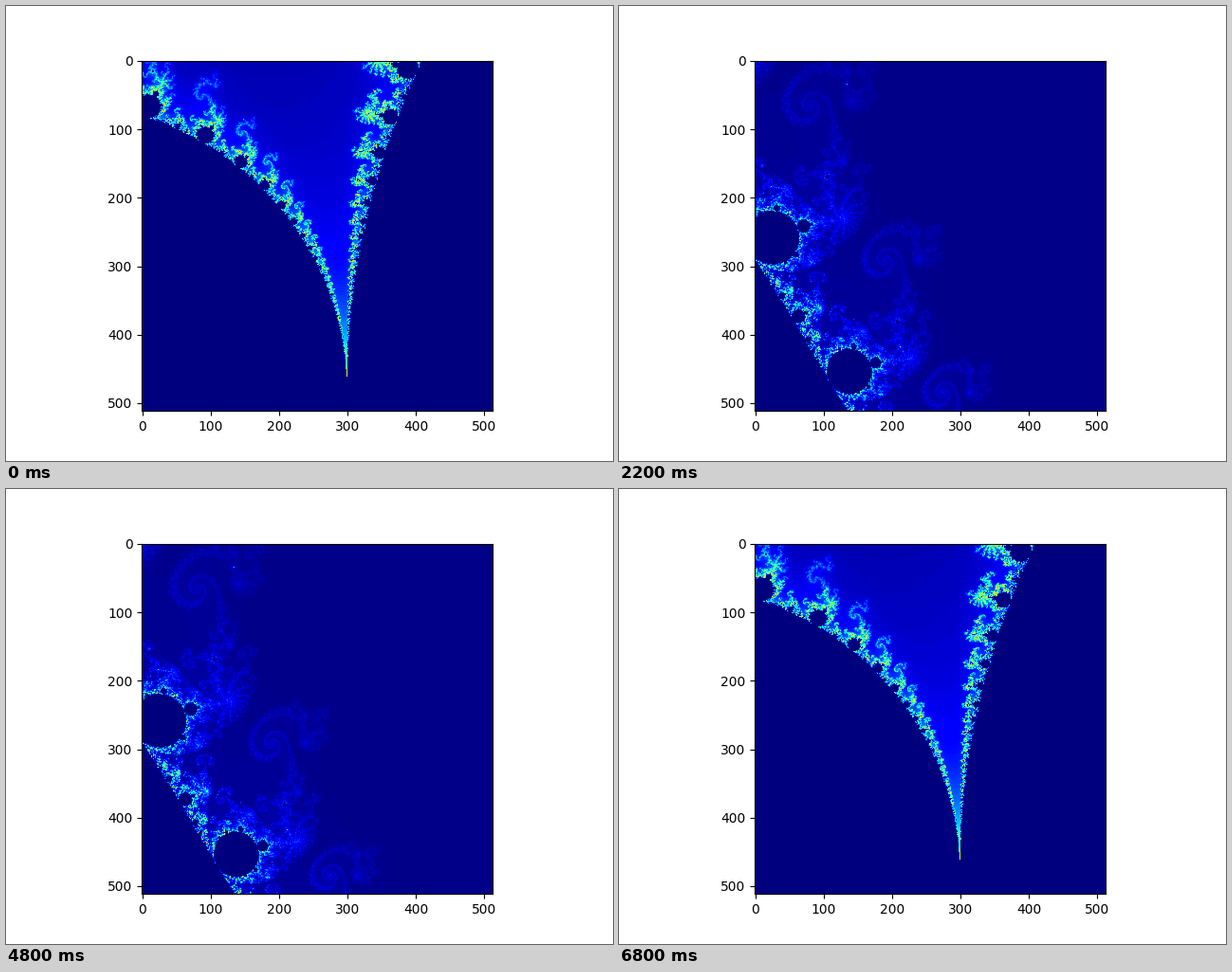
A matplotlib script for the animation above (7000 ms loop, 640 px wide and 480 px high).

```python
import numpy as np
import matplotlib.pyplot as plt
from matplotlib.animation import FuncAnimation

SIZE = 512
CENTER = (-0.77568377, 0.13646737)
SPAN = 0.3
BASE_ITER = 200
FRAMES = 35
INTERVAL = 200
CHUNK = 16


def in_main_bodies(cx, cy):
    """True inside the main cardioid or the period-2 disc."""
    y2 = cy * cy
    q = (cx - 0.25) ** 2 + y2
    return (q * (q + cx - 0.25) <= 0.25 * y2) | ((cx + 1) ** 2 + y2 <= 0.0625)


def mandelbrot(zoom):
    """Escape counts around CENTER; points that never escape are 0."""
    limit = BASE_ITER * zoom
    offset = np.linspace(-0.5, 0.5, SIZE) * SPAN / zoom
    cx, cy = (a.ravel() for a in np.meshgrid(CENTER[0] + offset,
                                             CENTER[1] - offset))
    counts = np.zeros(SIZE * SIZE, dtype=np.int32)
    idx = np.flatnonzero(~in_main_bodies(cx, cy))
    cx, cy = cx[idx], cy[idx]
    x, y = np.zeros_like(cx), np.zeros_like(cy)
    n = np.zeros(idx.size, dtype=np.int32)

    for step in range(1, limit + 1):
        x2, y2 = x * x, y * y
        y *= x
        y *= 2
        y += cy
        np.subtract(x2, y2, out=x)
        x += cx
        n += x * x + y * y <= 4
        if step % CHUNK == 0 or step == limit:
            inside = n == step
            gone = ~inside
            counts[idx[gone]] = n[gone]
            idx, n, x, y, cx, cy = (a[inside] for a in (idx, n, x, y, cx, cy))
            if not idx.size:
                break
    return counts.reshape(SIZE, SIZE)


def level(k):
    """Zoom in, hold, and come back out."""
    return min(max(k - 1, 0), FRAMES - 1 - k)


with np.errstate(all="ignore"):
    views = [mandelbrot(zoom) for zoom in range(1, 18)]

fig, ax = plt.subplots(figsize=(6.4, 4.8), dpi=100)
image = ax.imshow(views[0], cmap="jet")


def draw(k):
    view = views[level(k)]
    image.set_data(view)
    image.set_clim(0, view.max())
    return [image]


anim = FuncAnimation(fig, draw, frames=FRAMES, interval=INTERVAL,
                     repeat=True, repeat_delay=0)
plt.show()
```
